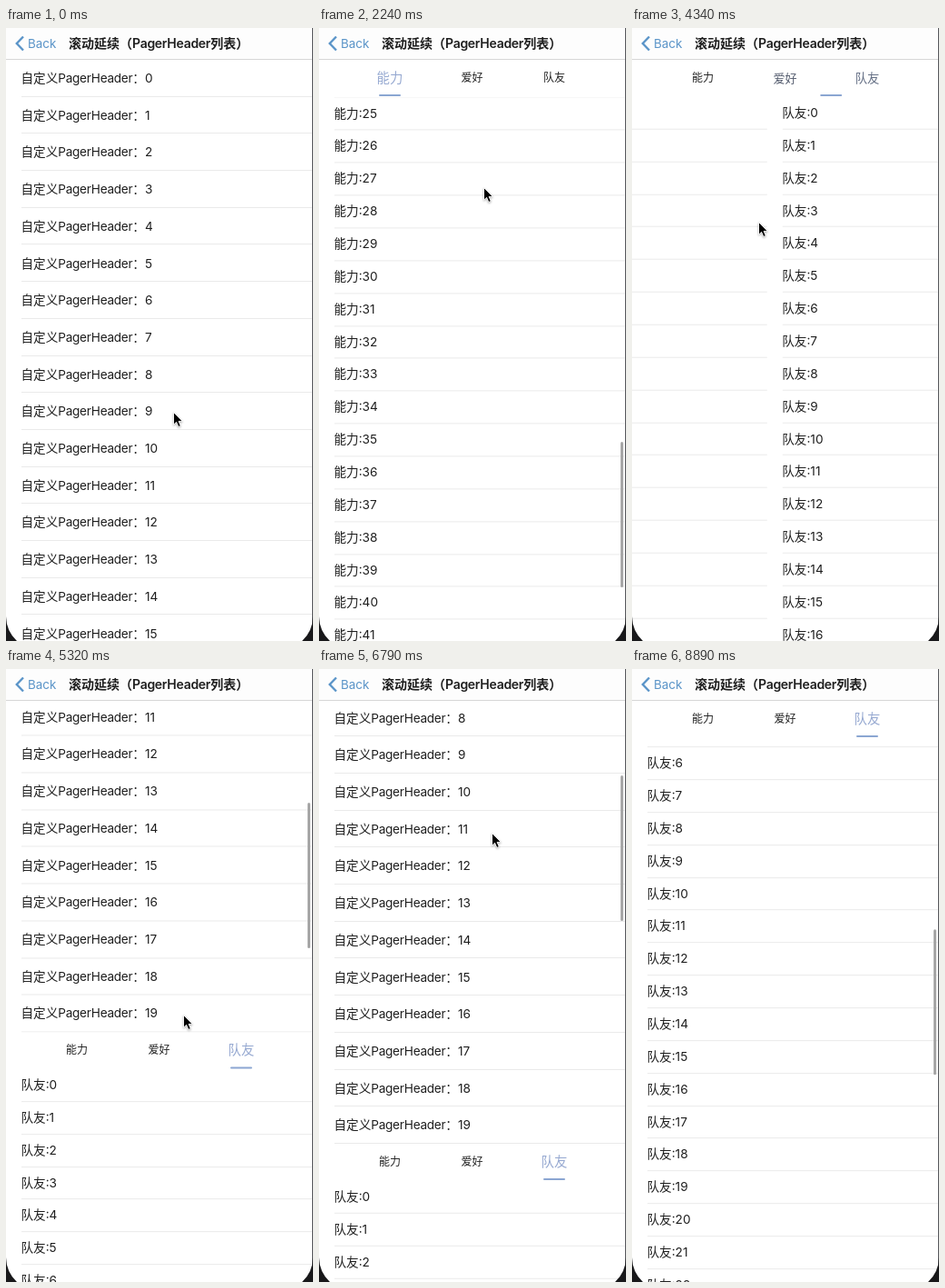
Write an HTML page that moves like this. It is 338 by 674 pixels and loops after 8960 ms.

```html
<!DOCTYPE html>
<html lang="zh-CN">
<head>
<meta charset="utf-8">
<title>PagerHeader</title>
<style>
  html, body { margin: 0; width: 100%; height: 100%; overflow: hidden; background: #fff; }
  #stage {
    position: relative; width: 338px; height: 674px; overflow: hidden; background: #fff;
    font: 13.6px Inter, "Noto Sans CJK SC", "Noto Sans CJK", sans-serif; color: #1e1e1e;
    white-space: nowrap;
  }
  #stage div, #stage svg { position: absolute; box-sizing: border-box; }
  #nav { left: 0; top: 0; width: 338px; height: 35px; background: #fdfdfd; border-bottom: 1px solid #d6d6d6; }
  #back { left: 24px; top: 0; line-height: 34px; font-size: 13.4px; color: #5a94c8; }
  #title { left: 69px; top: 0; line-height: 34px; font-size: 14px; font-weight: 600; color: #1e1e1e; }
  #title span, .row span { letter-spacing: -.02em; }
  .row { left: 16.5px; right: 0; border-bottom: 1px solid #eaeaea; }
  #head, #tabs, #pager { left: 0; top: 0; width: 338px; }
  #tabs { height: 40.7px; background: #fff; }
  .tab { top: 0; width: 60px; text-align: center; line-height: 40.7px; }
  #line { top: 37.6px; left: 66px; width: 24px; height: 2.2px; border-radius: 1px; background: #8ba6d2; }
  #pager { height: 674px; overflow: hidden; background: #fff; }
  .list { left: 0; top: 0; width: 338px; height: 100%; }
  #bar { left: 332px; top: 37.3px; width: 2.6px; height: 160px; border-radius: 2px; background: #a6a6a6; }
  #edge { left: 337px; top: 0; width: 1px; height: 674px; background: #55565a; }
  #frame { left: 0; top: 0; }
  #mouse { left: 0; top: 0; overflow: visible; filter: drop-shadow(0 1px 1px rgba(0, 0, 0, .3)); }
</style>
</head>
<body>
<div id="stage">
  <div id="head"></div>
  <div id="pager"></div>
  <div id="tabs"><div id="line"></div></div>
  <div id="bar"></div>
  <div id="nav">
    <svg width="24" height="34"><path d="M19 9.5 11.8 17 19 24.5" fill="none" stroke="#5a94c8" stroke-width="2.4"/></svg>
    <div id="back">Back</div>
    <div id="title">滚动延续（<span>PagerHeader</span>列表）</div>
  </div>
  <div id="edge"></div>
  <svg id="frame" width="338" height="674" fill="#18181a">
    <path d="M0 647V674H12A38 38 0 0 1 0 647Z"/>
    <path d="M338 647V674H326A38 38 0 0 0 338 647Z"/>
  </svg>
  <svg id="mouse" width="14" height="20">
    <path d="M.5 .5V14.2L3.6 11.3 5.8 16.5 8.3 15.4 6.1 10.4H10.3Z" fill="#000" stroke="#fff" stroke-width=".9"/>
  </svg>
</div>
<script>
const LOOP = 8960, STEP = 70;
const TOP = 35, HEAD_ROW = 40.7, LIST_ROW = 35.86, TAB_H = 40.7, HEAD_H = 20 * HEAD_ROW;
const W = 338, TAB_GAP = 90.5, SETTLE = 382, TRAVEL = 300;
const NAMES = ['能力', '爱好', '队友'];

const drag = (t0, t1, from, to) => ({ t0, t1, from, to });
const flickUp = drag(520, 840, [184, 422], [181, 175]);
const swipeA = drag(3340, 3540, [254, 210], [139, 210]);
const swipeB = drag(4080, 4270, [254, 213], [139, 213]);
const pullDown = drag(4900, 5180, [195, 206], [195, 380]);
const flickAgain = drag(6400, 6650, [190, 298], [190, 180]);
const leave = drag(8480, 8720, [190, 355], [-25, 345]);
const drags = [flickUp, swipeA, swipeB, pullDown, flickAgain, leave];

const $ = id => document.getElementById(id);
const clamp = x => Math.min(1, Math.max(0, x));
const mix = (a, b, u) => a + (b - a) * u;
const smooth = u => u * u * (3 - 2 * u);
const move = (el, x, y) => { el.style.transform = `translate(${x}px, ${y}px)`; };

function add(parent, cls, html) {
  const el = document.createElement('div');
  el.className = cls;
  el.innerHTML = html;
  parent.appendChild(el);
  return el;
}

function addRows(parent, count, height, label) {
  for (let i = 0; i < count; i++) {
    const row = add(parent, 'row', label(i));
    row.style.top = i * height + 'px';
    row.style.height = row.style.lineHeight = height + 'px';
  }
}

addRows($('head'), 20, HEAD_ROW, i => `自定义<span>PagerHeader</span>：${i}`);
const lists = NAMES.map(name => {
  const list = add($('pager'), 'list', '');
  addRows(list, 50, LIST_ROW, i => `${name}:${i}`);
  return list;
});
const tabs = NAMES.map((name, i) => {
  const tab = add($('tabs'), 'tab', name);
  tab.style.left = 48 + i * TAB_GAP + 'px';
  return tab;
});

const pull = (d, t) => clamp((t - d.t0) / (d.t1 - d.t0)) ** 2.5;

// The list follows the finger, then glides towards end.
function flick(d, t, s0, end, tau) {
  const s1 = s0 + d.from[1] - d.to[1];
  if (t < d.t1) return mix(s0, s1, pull(d, t));
  return end - (end - s1) * Math.exp((d.t1 - t) / tau);
}

const firstScroll = t => flick(flickUp, Math.min(t, 3010), 0, 1804, 500);

// Back to the top of the header, with a short bounce.
function scrollBack(t) {
  const s = flick(pullDown, t, HEAD_H, -194, 540);
  const late = t - 5967;
  return late < 0 ? s : -0.36 * late * Math.exp(-late / 60);
}

function scrollAt(t) {
  if (t < pullDown.t0) return firstScroll(t);
  return t < flickAgain.t0 ? scrollBack(t) : flick(flickAgain, t, 0, 1033, 540);
}

// The page follows the finger, then settles on the next one.
function swipe(d, t) {
  const part = (d.from[0] - d.to[0]) / W;
  const rest = 1 - clamp((t - d.t1) / SETTLE);
  return t < d.t1 ? part * pull(d, t) : 1 - (1 - part) * rest * rest;
}

// The pointer moves to each start point just before the drag begins.
function pointer(t) {
  let [x, y] = flickUp.from;
  for (const d of drags) {
    const go = smooth(clamp((t - d.t0 + TRAVEL) / TRAVEL)), u = pull(d, t);
    x = mix(mix(x, d.from[0], go), d.to[0], u);
    y = mix(mix(y, d.from[1], go), d.to[1], u);
  }
  return [x, y];
}

function draw(t) {
  const s = scrollAt(t);
  const page = swipe(swipeA, t) + swipe(swipeB, t);
  const tabY = TOP + Math.max(0, HEAD_H - s);

  move($('head'), 0, TOP - s);
  move($('tabs'), 0, tabY);
  move($('pager'), 0, tabY + TAB_H);

  const inner = [firstScroll(t), 0, t < pullDown.t0 ? 0 : s];
  lists.forEach((list, i) => move(list, (i - page) * W, -Math.max(0, inner[i] - HEAD_H)));

  tabs.forEach((tab, i) => {
    const on = clamp(1 - Math.abs(i - page));
    tab.style.fontSize = mix(12, 14.4, on) + 'px';
    tab.style.color = `rgb(${mix(34, 150, on)}, ${mix(34, 169, on)}, ${mix(34, 209, on)})`;
  });
  move($('line'), page * TAB_GAP, 0);

  // The scroll bar shows only while the content moves.
  move($('bar'), 0, 0.2446 * Math.max(0, s));
  $('bar').style.opacity = clamp(Math.abs(s - scrollAt(t - 2 * STEP)) / 3);
  move($('mouse'), ...pointer(t));
}

const start = performance.now();
function tick() {
  const t = (performance.now() - start) % LOOP;
  draw(Math.floor(t / STEP) * STEP);
  requestAnimationFrame(tick);
}
tick();
</script>
</body>
</html>
```
